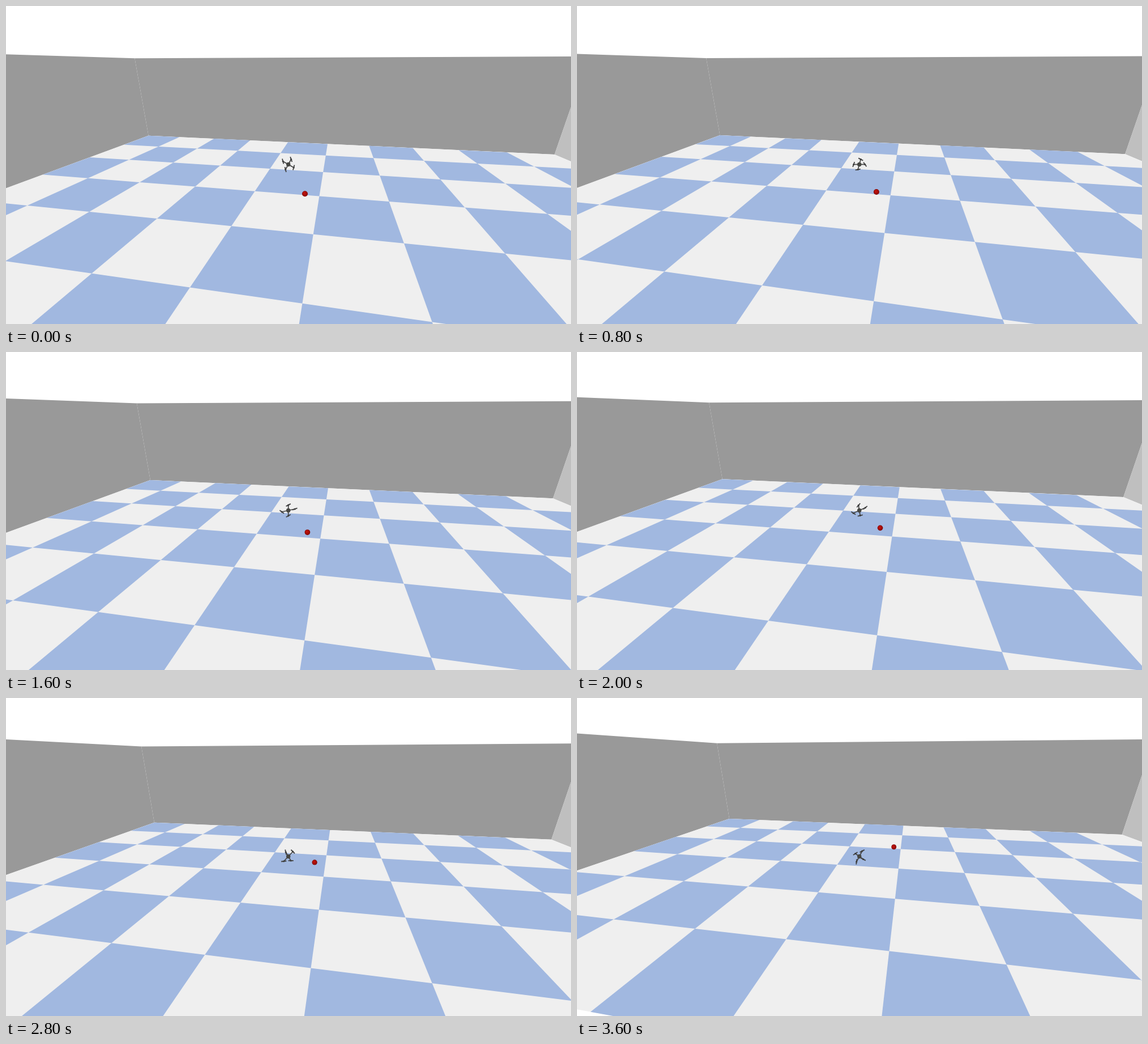
These frames come from a looping animation (998x561 px, 3700 ms). An HTML page with a canvas:

```html
<!DOCTYPE html>
<html lang="en">
<head>
<meta charset="utf-8">
<title>Drone and ball</title>
<style>
html, body { margin: 0; width: 100%; height: 100%; overflow: hidden; background: #fff; }
canvas { display: block; }
</style>
</head>
<body>
<canvas id="stage" width="998" height="561"></canvas>
<script>
const ctx = document.getElementById('stage').getContext('2d');
const CX = 499, CY = 280.5, FOCAL = CY / Math.tan(Math.PI / 6);
const LOOP = 3700, STEP = 100;
const rad = deg => deg * Math.PI / 180;
const [cy, sy] = [Math.cos(rad(10)), Math.sin(rad(10))];
const [cp, sp] = [Math.cos(rad(20)), Math.sin(rad(20))];

// Room, in floor squares
const WALL = 4.935, HEIGHT = 2, NEAR = -1;
const BALL_RADIUS = 0.02;

// Drone pose: two arm vectors and four blade angles at each key time
const keyTimes = [0, 0.8, 1.6, 2.4, 2.8, 3.2, 3.6];
const armA = [[5, -9], [2.5, -9], [0, -9.5], [-3, -8.5], [-4.5, -7.5], [-6, -6.5], [-7, -5]];
const armB = [[9.5, 5.5], [10, 0], [11.5, -2.5], [9.5, -7], [8, -8.5], [7, -9.5], [5, -9.5]];
const blades = [
  [70, 106, 75, 75], [27, 55, -12, 110], [-27, -20, -30, 35], [-73, -58, 0, 30],
  [-103, -135, 0, -6], [-135, -153, -27, -50], [-214, -207, 27, -84]
];

// Camera position; its direction never changes
function cameraAt(t) {
  const t2 = t * t, t3 = t2 * t;
  return [
    0.19 - 0.00028 * t2 - 0.00202 * t3,
    -1.734 - 0.02973 * t2 + 0.00076 * t3,
    1.847 - 0.00711 * t2 - 0.0019 * t3
  ];
}

function project([x, y, z], cam) {
  const dx = x - cam[0], dy = y - cam[1], dz = z - cam[2];
  const side = dx * cy + dy * sy;
  const ahead = dy * cy - dx * sy;
  const depth = ahead * cp - dz * sp;
  const up = ahead * sp + dz * cp;
  return [CX + FOCAL * side / depth, CY - FOCAL * up / depth, depth];
}

// World position of the ball, from its offset in the first view
const ball = (() => {
  const [side, up, depth] = [0.1155, -0.2023, 1.935];
  const ahead = depth * cp + up * sp;
  const cam = cameraAt(0);
  return [cam[0] + side * cy - ahead * sy, cam[1] + side * sy + ahead * cy, cam[2] + up * cp - depth * sp];
})();

function polygon(points, cam, color) {
  ctx.fillStyle = color;
  ctx.beginPath();
  for (const p of points) {
    const [x, y] = project(p, cam);
    ctx.lineTo(x, y);
  }
  ctx.fill();
}

function floorRect(x0, y0, x1, y1, cam, color) {
  polygon([[x0, y0, 0], [x1, y0, 0], [x1, y1, 0], [x0, y1, 0]], cam, color);
}

function wall(x0, y0, x1, y1, cam, color) {
  polygon([[x0, y0, 0], [x1, y1, 0], [x1, y1, HEIGHT], [x0, y0, HEIGHT]], cam, color);
}

function drawRoom(cam) {
  wall(-WALL, 0, -WALL, WALL, cam, '#999');
  wall(-WALL, WALL, WALL, WALL, cam, '#999');
  wall(WALL, 1, WALL, WALL, cam, '#bfbfbf');
  floorRect(-WALL, NEAR, WALL, WALL, cam, '#efefef');
  const clamp = v => Math.max(-WALL, Math.min(WALL, v));
  for (let i = -5; i < 5; i++) {
    for (let j = NEAR; j < 5; j++) {
      if ((i + j) % 2) floorRect(clamp(i), j, clamp(i + 1), clamp(j + 1), cam, '#a1b8e0');
    }
  }
}

function disc(x, y, r, fill) {
  ctx.fillStyle = fill;
  ctx.beginPath();
  ctx.arc(x, y, r, 0, 2 * Math.PI);
  ctx.fill();
}

function drawBall(cam) {
  const [x, y, depth] = project(ball, cam);
  const r = FOCAL * BALL_RADIUS / depth;
  const shade = ctx.createRadialGradient(x - r * 0.3, y - r * 0.4, 0, x, y, r);
  shade.addColorStop(0, '#c3150c');
  shade.addColorStop(0.6, '#ab0c06');
  shade.addColorStop(1, '#7c0502');
  disc(x, y, r, shade);
}

function line(x0, y0, x1, y1, width) {
  ctx.lineWidth = width;
  ctx.beginPath();
  ctx.moveTo(x0, y0);
  ctx.lineTo(x1, y1);
  ctx.stroke();
}

function drawDrone(t) {
  let k = 0;
  while (k < keyTimes.length - 2 && t >= keyTimes[k + 1]) k++;
  const u = (t - keyTimes[k]) / (keyTimes[k + 1] - keyTimes[k]);
  const mix = list => list[k].map((v, n) => v + (list[k + 1][n] - v) * u);
  const [a, b, angles] = [mix(armA), mix(armB), mix(blades)];
  const tips = [a, b, a.map(v => -v), b.map(v => -v)];
  ctx.save();
  ctx.translate(498.7, 279.5);
  ctx.strokeStyle = '#434343';
  tips.forEach(([x, y], n) => {
    const dx = 4.6 * Math.cos(rad(angles[n])), dy = 4.6 * Math.sin(rad(angles[n]));
    line(0, 0, x, y, 1.7);
    line(x - dx, y - dy, x + dx, y + dy, 1.8);
    disc(x, y, 1.6, '#3c3c3c');
  });
  disc(0, 0, 3.7, '#464642');
  ctx.restore();
}

function frame(now) {
  const t = Math.floor((now % LOOP) / STEP) * STEP / 1000;
  const cam = cameraAt(t);
  ctx.fillStyle = '#fff';
  ctx.fillRect(0, 0, 998, 561);
  drawRoom(cam);
  drawBall(cam);
  drawDrone(t);
}

const start = performance.now();
function tick() {
  frame(performance.now() - start);
  requestAnimationFrame(tick);
}
tick();
</script>
</body>
</html>
```
